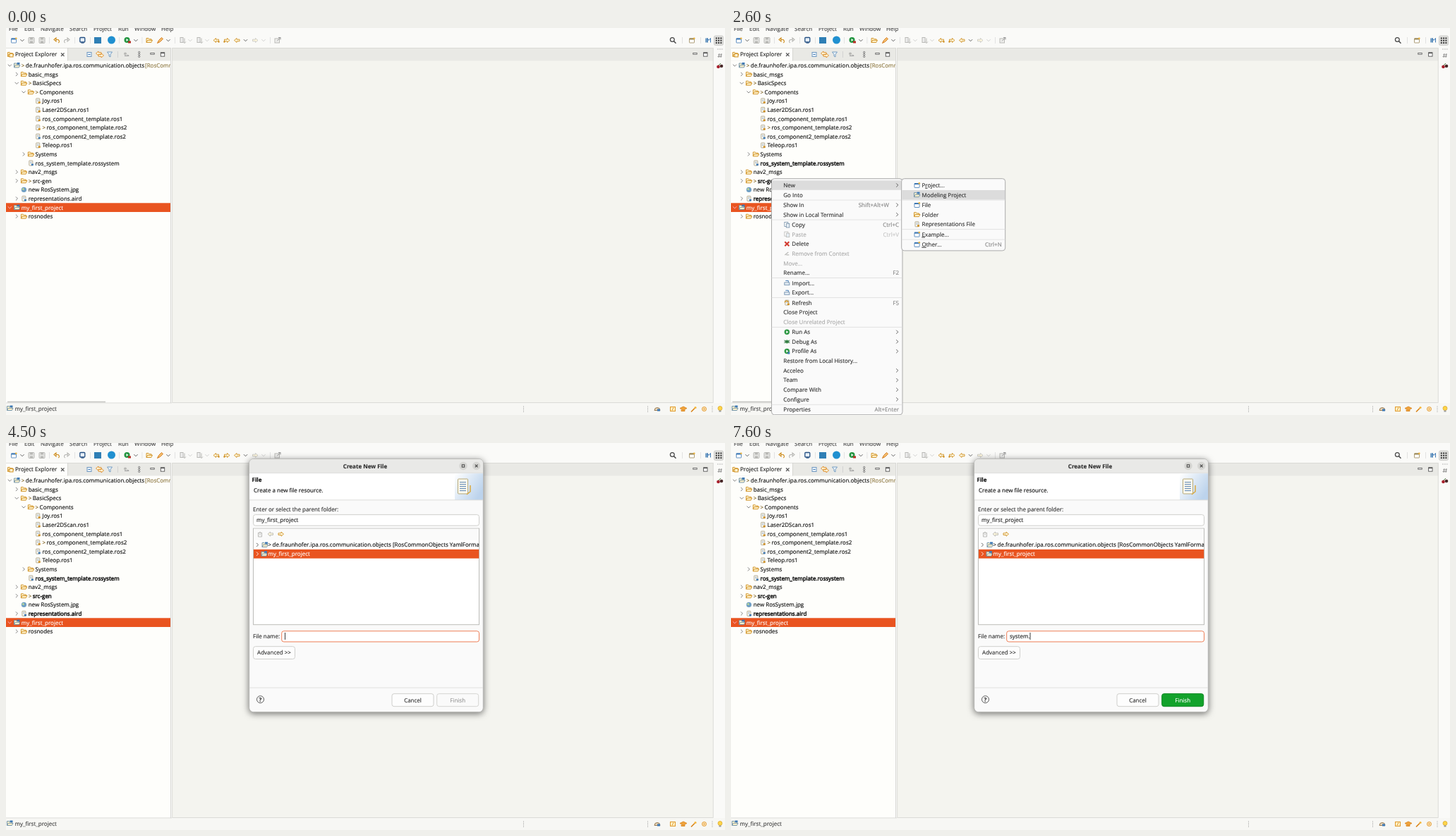
Animation, 1019 px wide and 549 px high, one loop 8 s. Source, as an HTML page:

```html
<!DOCTYPE html>
<html lang="en">
<head>
<meta charset="utf-8">
<title>Create a new file</title>
<style>
html, body { margin: 0; width: 100%; height: 100%; overflow: hidden; background: #fafaf8 }
svg { display: block; width: 100%; height: 100% }
text { font: 8px "Open Sans", "Noto Sans", sans-serif; text-rendering: geometricPrecision; stroke-width: .15px }
.bold { font-weight: 700 }
.marked .dirty { stroke-width: .45px }
.keys tspan { text-decoration: underline }
#dialog { filter: drop-shadow(0 2px 5px #0008) }
</style>
</head>
<body>
<svg id="stage" viewBox="0 0 1019 549"></svg>
<script>
const ORANGE = '#e95420', GOLD = '#cf8f22', BLUE = '#3d78b4', GREY = '#b9b9b6', INK = '#333';

// Drawing helpers, each returns SVG markup
const rect = (x, y, w, h, fill, more = '') => `<rect x="${x}" y="${y}" width="${w}" height="${h}" fill="${fill}" ${more}/>`;
const box = (x, y, w, h, fill, line, r = 0, more = '') => rect(x, y, w, h, fill, `stroke="${line}" rx="${r}" ${more}`);
const disc = (x, y, r, fill, more = '') => `<circle cx="${x}" cy="${y}" r="${r}" fill="${fill}" ${more}/>`;
const path = (d, line, w = 1, fill = 'none') => `<path d="${d}" stroke="${line}" stroke-width="${w}" fill="${fill}"/>`;
const text = (x, y, s, fill = INK, more = '') => `<text x="${x}" y="${y + 2.9}" fill="${fill}" stroke="${fill}" ${more}>${s}</text>`;
const group = (id, s, more = '') => `<g id="${id}" ${more}>${s}</g>`;
const each = (list, f) => list.map(f).join('');
const END = 'text-anchor="end"', MID = 'text-anchor="middle"';

// Icons, centred on x, y
const right = (x, y, c = '#555') => path(`M${x - 1.3} ${y - 2.6}l2.6 2.6l-2.6 2.6`, c, .9);
const down = (x, y, c = '#555') => path(`M${x - 2.6} ${y - 1.3}l2.6 2.6l2.6 -2.6`, c, .9);
const folder = (x, y, c = GOLD) => path(`M${x - 4} ${y + 3}v-6h3l1 1.3h3v1.5h1.5l-1.7 3.2zl1.6 -3.2h6`, c, .9, '#fff1c9');
const project = (x, y) => folder(x, y, '#6b8fa8') + rect(x, y - 4, 4, 2.5, BLUE);
const page = (x, y, c = GOLD) => box(x - 2.5, y - 3.5, 5, 7, '#fffdf2', '#a49a80', .5, 'stroke-width=".8"')
  + path(`M${x - 1.3} ${y - 1.5}h2.6m-2.6 1.5h2.6`, '#8aa3c0', .7) + rect(x + .5, y + 1, 3, 2.5, c);
const windowIcon = (x, y, c = BLUE) => box(x - 3.5, y - 2.5, 7, 6, '#fff', c, .5, 'stroke-width=".8"')
  + rect(x - 3.5, y - 3, 7, 2, c) + disc(x + 3.3, y - 2.7, 1.3, '#e9b13c');
const arrow = (x, y, dir, c = GOLD) => path(`M${x + 4 * dir} ${y}l${-3.5 * dir} -3v1.7h${-4 * dir}v2.6h${4 * dir}v1.7z`, c, .9, '#fff7dc');
const turn = (x, y, dir, c) => path(`M${x + 4 * dir} ${y - 1}l${-3 * dir} -2.5v5zM${x + dir} ${y - 1}h${-3 * dir}q${-3 * dir} 3 0 4.5`, c, 1.1);
const minimise = (x, y) => box(x - 2.7, y - 2, 5.4, 1.8, '#fff', '#555', 0, 'stroke-width=".8"');
const maximise = (x, y) => box(x - 2.7, y - 2.7, 5.4, 5.4, '#fff', '#555', 0, 'stroke-width=".9"') + rect(x - 2.7, y - 2.7, 5.4, 1.4, '#555');
const dots = (x, y) => each([0, 1, 2, 3], i => rect(x - .5, y - 4 + i * 2.4, 1, 1, '#999'));
const doc2 = (x, y, c) => box(x - 3.5, y - 3.5, 5, 6, '#fff', c, 0, 'stroke-width=".8"') + box(x - 1, y - 1.5, 4.5, 5.5, '#e6eef5', c, 0, 'stroke-width=".8"');
const floppy = (x, y) => box(x - 4, y - 4, 8, 8, '#e4e4e2', GREY, 1) + rect(x - 2, y - 4, 4, 3, GREY) + rect(x - 2, y + 1, 4, 3, GREY);

// level, fold state (c closed, o open), icon, label, flags (> changed, * becomes bold)
const TREE = [
  [0, 'o', project, 'de.fraunhofer.ipa.ros.communication.objects', '>'],
  [1, 'c', folder, 'basic_msgs', ''], [1, 'o', folder, 'BasicSpecs', '>'], [2, 'o', folder, 'Components', '>'],
  [3, '', page, 'Joy.ros1', ''], [3, '', page, 'Laser2DScan.ros1', ''],
  [3, '', page, 'ros_component_template.ros1', ''], [3, '', page, 'ros_component_template.ros2', '>'],
  [3, '', (x, y) => page(x, y, BLUE), 'ros_component2_template.ros2', ''], [3, '', page, 'Teleop.ros1', ''],
  [2, 'c', folder, 'Systems', ''], [2, '', (x, y) => page(x, y, BLUE), 'ros_system_template.rossystem', '*'],
  [1, 'c', folder, 'nav2_msgs', ''], [1, 'c', folder, 'src-gen', '>*'],
  [1, '', (x, y) => disc(x, y, 3.6, '#6f9fc4') + disc(x - 1, y - 1, 1.5, '#b9d69a'), 'new RosSystem.jpg', ''],
  [1, 'c', (x, y) => page(x, y, BLUE), 'representations.aird', '*'],
  [0, 'o', project, 'my_first_project', ''], [1, 'c', folder, 'rosnodes', '']
];

function treeRow([level, fold, icon, label, flags], i) {
  const y = 53 + 12.6 * i, dx = 9.9 * level, picked = i === 16, changed = flags.includes('>');
  const ink = picked ? '#fff' : '#111';
  return (picked ? rect(0, 248.3, 233, 12.7, ORANGE) : '')
    + (fold ? (fold === 'o' ? down : right)(5.3 + dx, y, picked ? '#fbd' : '#777') : '')
    + icon(15.5 + dx, y)
    + (changed ? text(21.8 + dx, y, '&gt;', '#806528') : '')
    + text(21.8 + dx + (changed ? 6 : 0), y, label, ink, flags.includes('*') ? 'class="dirty"' : '');
}

function toolbar() {
  const y = 17.5;
  const menus = [[4, 'File'], [26, 'Edit'], [49, 'Navigate'], [90, 'Search'], [124, 'Project'], [159, 'Run'], [182, 'Window'], [220, 'Help']];
  return rect(0, 0, 1019, 28, '#fafaf8')
    + each(menus, ([x, s]) => text(x, 1.4, s, '#444'))
    + each([61, 97, 119, 160, 192.5, 239, 374, 958, 984], x => rect(x, 13, .8, 9, '#ddd'))
    + windowIcon(11, y) + floppy(36, y) + floppy(51, y) + turn(72, y, -1, GOLD) + turn(86, y, 1, GREY)
    + box(104.8, y - 4, 7, 6.5, '#e8f1fa', '#244f82', 1, 'stroke-width="1.3"') + rect(106.5, y + 3, 4, 1.2, '#244f82')
    + rect(125, 13, 10, 9, '#2f7fb5') + disc(149.5, 17, 5.5, '#2090d0')
    + disc(171.5, y - .5, 4, '#239540') + path(`M170.5 ${y - 2.5}l3 2l-3 2z`, 'none', 0, '#fff') + rect(173, y + 1, 4, 3, '#b52f24')
    + folder(203, y) + path(`M214.5 ${y + 4}l2 -4l4 -4l2 2l-4 4z`, '#d47a1c', 1, '#f4c173')
    + each([250, 274], x => box(x - 3, y - 4, 4, 7, '#eee', GREY) + path(`M${x + 3} ${y - 3}v7m-2 -2l2 2l2 -2`, GREY))
    + each([23, 184, 230], x => down(x, y)) + each([261, 285, 365], x => down(x, y, '#ccc'))
    + arrow(298, y, -1) + disc(301.5, y + 2, 1.2, GOLD) + arrow(313, y, 1) + disc(309.5, y + 2, 1.2, GOLD)
    + arrow(327.5, y, -1) + down(339.5, y) + arrow(353, y, 1, '#c9c9c6')
    + box(381, y - 2.5, 6.5, 6, '#f0f0ee', GREY) + path(`M384 ${y + 1}l5 -5m-3 0h3v3`, '#999')
    + disc(944.3, y - 1, 2.9, 'none', 'stroke="#444" stroke-width="1.2"') + path(`M946.5 ${y + 1.2}l3 3`, '#444', 1.4)
    + windowIcon(972, y, '#9a8757') + rect(991, y - 3, 4, 6, '#7ea6c9') + path(`M994 ${y + 3}v-6l2 3l2.5 -3v6`, BLUE)
    + box(1003.5, 11, 13, 13.5, '#e0e0de', '#cfcfcc', 2)
    + each([0, 1, 2, 3, 4, 5, 6, 7, 8], i => rect(1005.8 + i % 3 * 3.3, 13.5 + (i / 3 | 0) * 3.3, 2, 2, '#333'));
}

function panels() {
  const y = 37.5;
  return rect(233, 28, 786, 521, '#fafaf8')
    + rect(0, 28, 233, 18.5, '#e9e9e5') + rect(0, 28, 87.5, 18.5, '#fefefb') + rect(87, 28, .8, 18.5, '#cfcfcb')
    + rect(0, 28, 233, .7, '#d5d5d1')
    + folder(6.5, y) + box(5, y - 1, 5, 4.5, '#fff6d5', GOLD) + text(13, y, 'Project Explorer', '#222')
    + path(`M78 ${y - 2}l4.5 4.5m0 -4.5l-4.5 4.5`, '#555', 1.1)
    + box(115, y - 3, 6, 6, '#eaf3fc', '#7098bf') + rect(116.5, y - .5, 3, 1, BLUE)
    + arrow(131.5, y - 1.5, -1, '#dd8b24') + arrow(134.5, y + 1.5, 1, '#dd8b24')
    + path(`M143.5 ${y - 3.5}h7l-2.5 3.5v3.5l-2 -1v-2.5z`, '#6b96bb', .9, '#eaf3fc')
    + rect(158, 33, .8, 9, '#ccc') + disc(169, y - 1, 2, GREY) + path(`M168 ${y + 2}h6l-2 -2`, '#999')
    + each([-3, 0, 3], d => disc(188.7, y + d, 1.1, '#fff', 'stroke="#555" stroke-width=".8"'))
    + minimise(207.5, y) + maximise(222, y)
    + rect(233, 28, .8, 504, '#cfcfcb') + rect(235.5, 28, 767, 504, '#f4f4ef') + rect(235.5, 28, 767, 18.5, '#e9e9e5')
    + box(235.7, 28.3, 766.5, 503.3, 'none', '#d5d5d1', 0, 'stroke-width=".8"')
    + minimise(976.5, y) + maximise(991.3, y)
    + each([0, 1, 2, 3], i => rect(1008 + i * 2.2, 29.5, 1, 1, '#999'))
    + path('M1011 36l-1 6m4 -6l-1 6m-4 -4h6m-6.500 2.500h6', '#777', .7)
    + disc(1009.5, 55, 2.3, '#a8202c') + disc(1014, 54, 2.3, '#4a2a2a') + path('M1010 53l3 -3', '#487339');
}

function statusBar() {
  const y = 540.5;
  return rect(0, 532, 1019, 17, '#f7f7f4') + rect(0, 531.5, 235, .8, '#d5d5d1')
    + project(5.5, y - 1) + text(12.5, y - .8, 'my_first_project', '#444')
    + each([733.5, 909.5, 1001], x => dots(x, y))
    + path(`M919 ${y + 2}q0 -4 4 -4t4 4z`, '#997c55', 1, '#e9d6b8') + rect(923, y, 4, 3, BLUE)
    + box(941.5, y - 3, 7, 6, '#fff0c4', '#e09a2c') + path(`M944 ${y + 2}l2 -4`, '#e09a2c')
    + path(`M955 ${y - 1}l5 -2.5l5 2.500l-5 2.500zM957 ${y + 1}v2h5v-2`, '#d98118', .8, '#f0a43d')
    + path(`M971 ${y + 4}l5 -5`, '#d98118', 1.6) + disc(977, y - 2, 1.6, '#f4b73c')
    + disc(989.5, y, 3, '#fbe3b5', 'stroke="#e29a35"') + disc(989.5, y, 1, '#e29a35')
    + disc(1012, y - 1, 3, '#ffd54a', 'stroke="#d5a227" stroke-width=".7"') + rect(1010.5, y + 2, 3, 2, '#999');
}

// label with _ before its key, shortcut (> is a submenu), icon; - is a separator, ! is disabled
const bug = (x, y) => disc(x, y, 2.5, '#4d9a57') + path(`M${x - 4} ${y - 2}l8 4m0 -4l-8 4M${x - 4} ${y}h8`, '#2f7040', .8);
const play = (x, y) => disc(x, y, 3.7, '#2e9844') + path(`M${x - 1} ${y - 2}l3 2l-3 2z`, 'none', 0, '#fff');
const cross = (x, y) => path(`M${x - 3} ${y - 3}l6 6m0 -6l-6 6`, '#d23a30', 2);
const tray = (x, y) => box(x - 3.5, y - .5, 7, 3.5, '#e8eff6', '#7d99b5') + path(`M${x - 2} ${y - 3}h4v2`, BLUE);
const MENU = [
  ['Ne_w', '>'], ['Go _Into'], '-', ['Sho_w In', 'Shift+Alt+W>'], ['Sho_w in Local Terminal', '>'], '-',
  ['_Copy', 'Ctrl+C', (x, y) => doc2(x, y, '#7690a8')], ['!_Paste', 'Ctrl+V', (x, y) => doc2(x, y, GREY)],
  ['_Delete', '', cross], ['!Remo_ve from Context', '', (x, y) => path(`M${x - 3} ${y + 2}l5 -4m-3 4h4`, GREY, 1.2)],
  ['!Mo_ve...'], ['Rena_me...', 'F2'], '-', ['_Import...', '', tray], ['Exp_ort...', '', tray], '-',
  ['Re_fresh', 'F5', (x, y) => page(x, y) + path(`M${x - 3} ${y}a2.500 2.500 0 0 1 5 0`, GOLD, 1.2)],
  ['Clo_se Project'], ['!Close _Unrelated Project'], '-',
  ['_Run As', '>', play], ['_Debug As', '>', bug], ['_Profile As', '>', (x, y) => play(x, y) + rect(x + 1, y + 1, 3, 3, BLUE)],
  ['Restore from Local Histor_y...'], ['Acceleo', '>'], ['T_eam', '>'], ['Comp_are With', '>'], ['Confi_gure', '>'], '-',
  ['P_roperties', 'Alt+Enter']
];
const SUBMENU = [
  ['P_roject...', '', windowIcon], ['Modeling Project', '', project], '-',
  ['File', '', windowIcon], ['Folder', '', folder], ['Representations File', '', page], '-',
  ['_Example...', '', windowIcon], '-', ['_Other...', 'Ctrl+N', windowIcon]
];

function menu(id, items, x, w, h, textX) {
  let y = 223, s = '';
  for (const item of items) {
    if (item === '-') { s += rect(x, y - 6.6, w, .7, '#d9d9d9'); y += .7; continue; }
    const [label, keys = '', icon] = item, off = label[0] === '!', sub = keys.endsWith('>');
    const ink = off ? '#aaa' : INK, name = label.replace('!', '').replace(/_(.)/, '<tspan>$1</tspan>');
    s += (icon ? icon(textX + 5, y) : '') + text(textX + (icon ? 12 : 0), y, name, ink)
      + text(x + w - (sub ? 19 : 5), y, keys.replace('>', ''), off ? '#c4c4c4' : '#888', END)
      + (sub ? right(x + w - 7.5, y) : '');
    y += 13.65;
  }
  return group(id, box(x, 213.7, w, h, '#fafafa', '#aaa', 4)
    + rect(x + .5, 0, w - 1, 13.5, '#dcdcdc', `id="${id}Hover"`) + s);
}

function dialog() {
  const button = (x, y, w, h, s, fill = '#fdfdfd', line = '#cfcfcc', ink = INK) =>
    box(x, y, w, h, fill, line, 3) + text(x + w / 2, y + h / 2, s, ink, MID);
  return group('dialog',
    box(344.7, 22.7, 331.6, 359, '#fafafa', '#b5b5b2', 6)
    + path('M345 43v-14q0 -6 6 -6h319q6 0 6 6v14z', 'none', 0, '#e9e9e7') + rect(345, 42.6, 331, .8, '#d2d2cf')
    + text(509, 32.7, 'Create New File', INK, `class="bold" ${MID}`)
    + disc(648, 32.5, 5.7, '#d6d6d3') + box(646.3, 30.8, 3.4, 3.4, 'none', '#444')
    + disc(666.7, 32.5, 5.7, '#d6d6d3') + path('M664.8 30.600l3.8 3.8m0 -3.8l-3.8 3.8', '#444', 1.1)
    + rect(345, 43.2, 331, 37.6, '#fff') + rect(636, 43.2, 40, 37.6, 'url(#sky)') + rect(345, 80.500, 331, .8, '#d5d5d2')
    + box(640.5, 51, 14, 21, '#fdfbf0', '#b6a878', 1) + each([0, 1, 2, 3, 4], i => rect(643, 55 + i * 3, 9, 1.2, '#6d92bb'))
    + path('M653 73l5 -4v-9', '#d9a93e', 1.5)
    + text(348.500, 52, 'File', '#111', 'class="bold"') + text(351, 67, 'Create a new file resource.', '#111')
    + text(350, 94, 'Enter or select the parent folder:')
    + box(350.5, 101.7, 320, 15.500, '#fff', '#cfcfcc', 3) + text(355, 109.3, 'my_first_project', '#222')
    + box(350.5, 121.2, 320, 136.500, '#fff', '#bdbdba') + rect(351, 121.7, 319, 16, '#fafafa')
    + path('M357.5 127v6h5v-6m-2.500 4v-5m-2 2l2 -2l2 2', GREY) + arrow(375, 129.2, -1, GREY) + arrow(389.5, 129.2, 1)
    + rect(351, 151, 319.2, 12.7, ORANGE)
    + right(356.3, 144.500, '#555') + project(367, 144.500) + right(356.3, 157.3, '#fff') + project(366, 157.3)
    + `<g clip-path="url(#list)">${text(371.5, 144.5, '&gt;', INK) + text(377.5, 144.5, 'de.fraunhofer.ipa.ros.communication.objects [RosCommonObjects YamlFormat]', '#111')}</g>`
    + text(371.5, 157.3, 'my_first_project', '#fff')
    + text(350, 274.3, 'File name:') + box(390.700, 266.8, 279.8, 15.2, '#fff', '#ee7d55', 3)
    + text(395, 274.3, '', '#222', 'id="name"') + rect(395, 269, .9, 10, '#222', 'id="caret"')
    + button(350.5, 288.7, 59, 17.7, 'Advanced &gt;&gt;') + rect(345, 346.700, 331, .8, '#dcdcd9')
    + disc(360.5, 363.8, 5, '#fff', 'stroke="#555"') + text(360.5, 363.8, '?', INK, `class="bold" ${MID}`)
    + button(547, 355.7, 59, 18, 'Cancel') + button(610.700, 355.7, 59, 18, 'Finish', '#fafafa', '#d5d5d2', '#999')
    + group('finish', button(610.700, 355.7, 59, 18, 'Finish', '#12a22b', '#0d8a22', '#fff')));
}

const stage = document.getElementById('stage');
stage.innerHTML = `<defs><linearGradient id="sky" x2="1" y2=".6"><stop stop-color="#fff"/><stop offset="1" stop-color="#bcd3ec"/></linearGradient>
  <clipPath id="list"><rect x="351" y="121" width="319.300" height="137"/></clipPath></defs>`
  + rect(0, 46, 233, 486, '#fefefb') + each(TREE, treeRow) + text(197, 53, '[RosCommonObjects', '#8f7a45')
  + rect(2, 529.6, 139, 1.6, '#8f8f8c', 'id="scroll"')
  + panels() + toolbar() + statusBar()
  + menu('menu', MENU, 57.5, 185.5, 335, 74.3) + menu('sub', SUBMENU, 241.700, 147, 102.2, 258.5) + dialog();

const $ = id => document.getElementById(id);
const show = (id, on) => $(id).setAttribute('opacity', +on);

// Timelines: [start ms, value]
const SCROLL = [[0, .5], [200, .65], [400, .8], [700, 1], [2500, .75], [2600, .5], [2700, .25], [3000, 0]];
const HOVER = [[0, -99], [1500, 251], [1700, 237], [1900, 223]];
const SUBHOVER = [[0, -99], [2500, 236.7], [2700, 251]];
const NAME = [[0, ''], [5200, 'y'], [5800, ''], [6000, 's'], [6200, 'sy'], [6300, 'sys'], [6500, 'syst'], [6600, 'syste'], [6800, 'system'], [7600, 'system.']];
const CARET = [[0, 1], [4200, 0], [4500, 1], [5400, 0], [5800, 1], [7000, 0], [7500, 1]];
const FINISH = [[0, 0], [5200, .4], [5300, .8], [5400, 1], [5800, .5], [5900, 0], [6000, .5], [6100, 1]];
const DIALOG = [[0, 0], [3400, .7], [3500, 1]];
const at = (line, t) => line.findLast(([start]) => start <= t)[1];

function draw(now) {
  const t = now % 8000;
  stage.classList.toggle('marked', t >= 1100);
  show('scroll', at(SCROLL, t));
  show('menu', t >= 1100 && t < 3300);
  show('sub', t >= 2300 && t < 3300);
  $('menu').classList.toggle('keys', t >= 1200 && t < 2500);
  $('sub').classList.toggle('keys', t >= 2500);
  $('menuHover').setAttribute('y', at(HOVER, t) - 6.7);
  $('subHover').setAttribute('y', at(SUBHOVER, t) - 6.7);
  show('dialog', at(DIALOG, t));
  show('finish', at(FINISH, t));
  show('caret', at(CARET, t));
  const name = $('name');
  name.textContent = at(NAME, t);
  $('caret').setAttribute('x', 395 + name.getComputedTextLength());
  requestAnimationFrame(draw);
}
requestAnimationFrame(draw);
</script>
</body>
</html>
```
